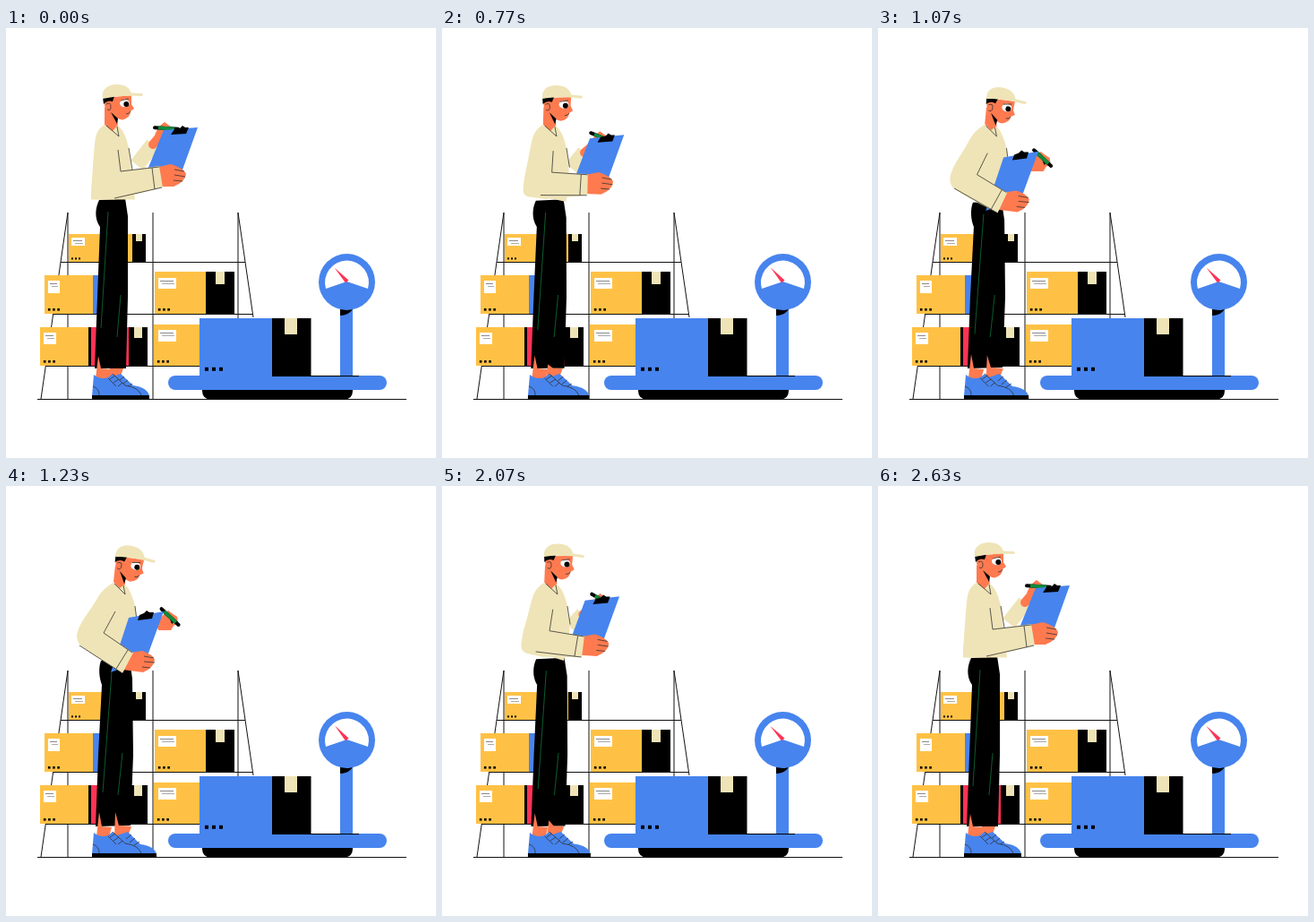
An HTML page that plays this animation: 480x480 px, repeating every 2.67 s.

```html
<!DOCTYPE html>
<html lang="en">
<head>
<meta charset="utf-8">
<style>
  html, body { margin: 0; width: 100%; height: 100%; overflow: hidden; background: #fff; }
  svg { display: block; width: 100%; height: 100%; }
  .blue { fill: #4784ee; }
  .skin { fill: #ff7a4f; }
  .beige { fill: #efe4b7; }
  .line { fill: none; stroke: #333; stroke-width: .8; }
  .green { fill: none; stroke: #0c5a2c; }
</style>
</head>
<body>
<svg viewBox="0 0 480 480">
  <path d="M69 206V414M164 206V414M259 206V324M69 206L39 414M259 206L276 323M61 261.5H267M53 319.5H276M44 377.5H217M35 414.5H447" fill="none" stroke="#111"/>
  <g id="boxes"></g>

  <!-- scale -->
  <path class="blue" d="M373 310H387V390H373Z"/>
  <path d="M373 314H387Q382 321 373 321Z"/>
  <circle class="blue" cx="380.5" cy="283.5" r="31.5"/>
  <path d="M380.500 283L357 291A24.500 24.500 0 1 1 404 291Z" fill="#fff"/>
  <path id="needle" d="M366.500 267.500L382.500 281.500L379 284.500Z" fill="#ff3355"/>
  <path d="M219 403H387V405Q387 414.500 377 414.500H229Q219 414.500 219 405Z"/>
  <rect class="blue" x="181" y="388" width="244" height="16" rx="8"/>
  <path d="M297 388.500H394" stroke="#000"/>

  <g id="legs">
    <path d="M104 192C100 200 98 212 105 222L102 300L99 380L134 380L136 300L136 210L133 190Z"
      data-to="M106 195C103 203 104 214 107 222L103 300L100 380L139 379L142 300L141 215L138 194Z"/>
    <path class="green" d="M114 205L106 335M128 298L124 345" data-to="M118 208L108 342M130 298L125 345"/>
    <path class="skin" d="M103 366L100 391L115 391L117 381L106 380Z" data-to="M104 364L101 391L115 391L118 381L107 380Z"/>
    <path class="skin" d="M116 380L113 391L127 391L131 380L122 380Z" data-to="M122 364L121 391L136 391L140 380L126 379Z"/>
    <path class="blue" d="M113 391L128 386L142 399Q158 401 160 411L108 411Z" data-to="M121 391L136 386L150 400Q166 402 168 411L113 411Z"/>
    <path class="line" d="M126 394L132 389M130 398L136 393M135 401L141 397" data-to="M134 394L140 389M138 398L144 393M143 401L149 397"/>
    <path class="blue" d="M98 387Q105 393 114 390L119 386L133 399Q148 401 151 411H96Z"/>
    <path class="line" d="M119 386L133 399Q148 401 151 410M97 400Q104 402 104 410M114 391L123 400M116 392L122 388M120 396L126 392M125 400L130 396"/>
    <path d="M96 410L160 410L160 415L96 415Z" data-to="M96 410L168 410L168 415L96 415Z"/>
  </g>

  <!-- writing arm -->
  <path id="sleeve" fill="none" stroke="#efe4b7" stroke-width="17"/>
  <path id="wrist" fill="none" stroke="#ff7a4f" stroke-width="10" stroke-linecap="round"/>
  <g id="hand">
    <path class="skin" d="M-11 12C-13 3 -6 -6 0 -10L4 -7L10 -3L11 4L6 7L3 12Z"/>
    <path d="M2 0L8 1L4 5Z"/>
    <g id="pen" fill="none" stroke-width="4" stroke-linecap="round">
      <path d="M-13 0H13" stroke="#000"/>
      <path d="M-9 0H9" stroke="#0e8a3e" stroke-linecap="butt"/>
    </g>
  </g>

  <!-- neck, head -->
  <path class="skin" d="M110 88L110 108L119 116L125 112L124 98Z" data-to="M122 88L120 107L127 115L133 111L133 100Z"/>
  <g id="head">
    <path class="skin" d="M110 78L140 75L140 85L143 90L139 93Q139 100 130 102.500Q123 102 118 94Q108 92 110 78Z"/>
    <path d="M108 77L121 76L119 82Q113 80 109 85Z"/>
    <path class="line" d="M112 85Q117 82 117 88Q117 93 113 91M134 96Q138 96 139 93"/>
    <g id="eye">
      <ellipse cx="132.500" cy="84" rx="5.500" ry="4.300" fill="#fff"/>
      <circle cx="134.300" cy="85" r="3"/>
    </g>
    <path class="line" d="M128 81L137 79"/>
    <path class="beige" d="M108 79C106 68 114 63 124 63C133 63 138 67 140 72.500L152 73Q154 75 151 76C135 75 120 76 108 79Z"/>
  </g>
  <path d="M117 94L125 101L124 107Z" data-to="M127 95L134 103L132 109Z"/>

  <!-- jacket, clipboard, holding arm -->
  <path class="beige" d="M110 108C103 112 100 118 99 130C97 150 96 170 95 191.500L144 191.500L140 158L137 134C134 120 130 112 124 109L119 115Z"
    data-to="M120 108C112 112 106 118 101 127C92 142 85 152 82 165L125 200L146 165L145 138C142 125 138 113 132 110L127 114Z"/>
  <path class="line" d="M112 109L126 121L124 110M137 134L141 158" data-to="M121 109L133 121L131 111M144 134L146 150"/>
  <g class="board">
    <path class="blue" d="M176 114L214 111L196 161L158 158Z" data-to="M137 147L176 140L157 192L117 208Z"/>
    <path d="M184 119L188 113L194 112L197 109L200 111L204 111L201 118Z" data-to="M147 150L149 144L154 142L157 139L160 141L165 141L163 148Z"/>
  </g>
  <g class="board">
    <path class="skin" d="M170 155L184 152Q198 156 201 163Q200 172 187 177L172 177Z" data-to="M139 186L152 184Q164 188 166 194Q165 203 153 208L130 205Z"/>
    <path class="line" d="M188 158L199 160M188 164L200 166M187 170L197 171" data-to="M154 190L165 192M154 196L166 197M152 202L161 203"/>
  </g>
  <path class="beige" d="M102 130C98 150 96 165 95 186Q95 191.500 100 191.500L121 191.500L175 178L171 154L128 160Z"
    data-to="M100 129C92 142 82 152 79 166Q79 176 86 180L100 190L130 209L142 186L109 164Z"/>
  <path class="line" d="M125 136L128 160L171 155M163 156L166 180M121 190L174 178" data-to="M122 140L109 164L141 186M136 183L123 204M82 178L130 209"/>
</svg>
<script>
const LOOP = 2670;
const $ = id => document.getElementById(id);
const rect = (x, y, w, h, fill) => `<rect x="${x}" y="${y}" width="${w}" height="${h}" fill="${fill}"/>`;

// A carton: front, side wall, tape on the side, optional label, three dots.
function carton({ x, y, w, bottom, front = '#ffc145', side = 0, sideFill = '#000', tape, label, dot = 2.6, band }) {
  const h = bottom - y;
  let out = rect(x, y, w, h, front) + rect(x + w, y, side, h, sideFill);
  if (band) out += rect(band[0], y, band[1], h, '#ff3355');
  if (tape) out += rect(tape[0], y, tape[1], tape[2], '#efe4b7');
  if (label) {
    const [lx, ly, lw, lh] = label;
    out += rect(lx, ly, lw, lh, '#fff') + rect(lx + 2, ly + 3, lw - 5, 1, '#888') + rect(lx + 4, ly + 6, lw - 6, 1, '#aaa');
  }
  for (let i = 0; i < 3; i++) out += rect(x + dot * 1.5 + i * dot * 2, bottom - dot * 2.3, dot, dot, '#000');
  return out;
}

$('boxes').innerHTML = [
  { x: 70, y: 230, w: 71, bottom: 261, side: 15, tape: [145, 7, 8], label: [73, 234, 15, 9], dot: 2 },
  { x: 43, y: 276, w: 54, bottom: 319, side: 28, sideFill: '#4784ee', label: [47, 282, 13, 14] },
  { x: 38, y: 334, w: 54, bottom: 377, side: 66, band: [95, 42], tape: [143, 9, 12], label: [42, 340, 14, 13] },
  { x: 166, y: 272, w: 57, bottom: 319, side: 32, tape: [234, 10, 14], label: [170, 279, 20, 12] },
  { x: 165, y: 331, w: 52, bottom: 377, label: [170, 337, 20, 13] },
  { x: 216, y: 324, w: 81, bottom: 388, front: '#4784ee', side: 43.5, tape: [311, 14, 18], dot: 4 }
].map(carton).join('');

const lerp = (a, b, k) => a + (b - a) * k;
const ease = (t, from, to) => {
  const k = Math.min(1, Math.max(0, (t - from) / (to - from)));
  return k * k * (3 - 2 * k);
};
const NUMBER = /-?\d+(\.\d+)?/g;
const morphs = [...document.querySelectorAll('[data-to]')].map(el => ({
  el, from: el.getAttribute('d'), to: el.dataset.to.match(NUMBER)
}));
const place = (el, transform) => el.setAttribute('transform', transform);

function draw(now) {
  const t = now % LOOP;
  const lean = ease(t, 550, 1180) - ease(t, 1700, 2370);
  const swing = 4 * lean * (1 - lean);
  const reach = ease(t, 0, 350) - ease(t, 450, 750);
  const scribble = Math.sin(t / LOOP * Math.PI * 16) * lean;

  for (const { el, from, to } of morphs) {
    let i = 0;
    el.setAttribute('d', from.replace(NUMBER, n => lerp(+n, +to[i++], lean).toFixed(2)));
  }
  // The knees push forward halfway through the lean.
  place($('legs'), `translate(98) scale(${1 + .04 * swing} 1) translate(-98)`);
  place($('head'), `translate(${14 * lean}) rotate(${13 * lean} 108 79)`);
  document.querySelectorAll('.board').forEach(el => place(el, `translate(${2 * reach} ${-reach})`));

  const hx = lerp(177, 182, lean) - 19 * reach - 3 * swing + scribble;
  const hy = lerp(115, 150, lean) + 7 * reach + scribble;
  const wx = hx - lerp(13, 28, lean) + 7 * reach;
  const wy = hy + lerp(15, 11, lean);
  const ex = lerp(146, 140, lean) - 4 * reach;
  const ey = lerp(153, 165, lean) - 4 * reach;
  $('sleeve').setAttribute('d', `M${ex} ${ey}L${wx} ${wy}`);
  $('wrist').setAttribute('d', `M${wx} ${wy}L${hx} ${hy}`);
  place($('hand'), `translate(${hx} ${hy})`);
  place($('pen'), `translate(2 -3) rotate(${lerp(3, 43, lean) + 5 * reach + 10 * swing})`);

  const blink = 1 - .5 * (ease(t, 830, 910) - ease(t, 950, 1030));
  place($('eye'), `translate(0 85) scale(1 ${blink}) translate(0 -85)`);
  place($('needle'), `rotate(${1.5 * Math.sin(t / LOOP * Math.PI * 10)} 380.5 283)`);
  requestAnimationFrame(draw);
}
requestAnimationFrame(draw);
</script>
</body>
</html>
```
